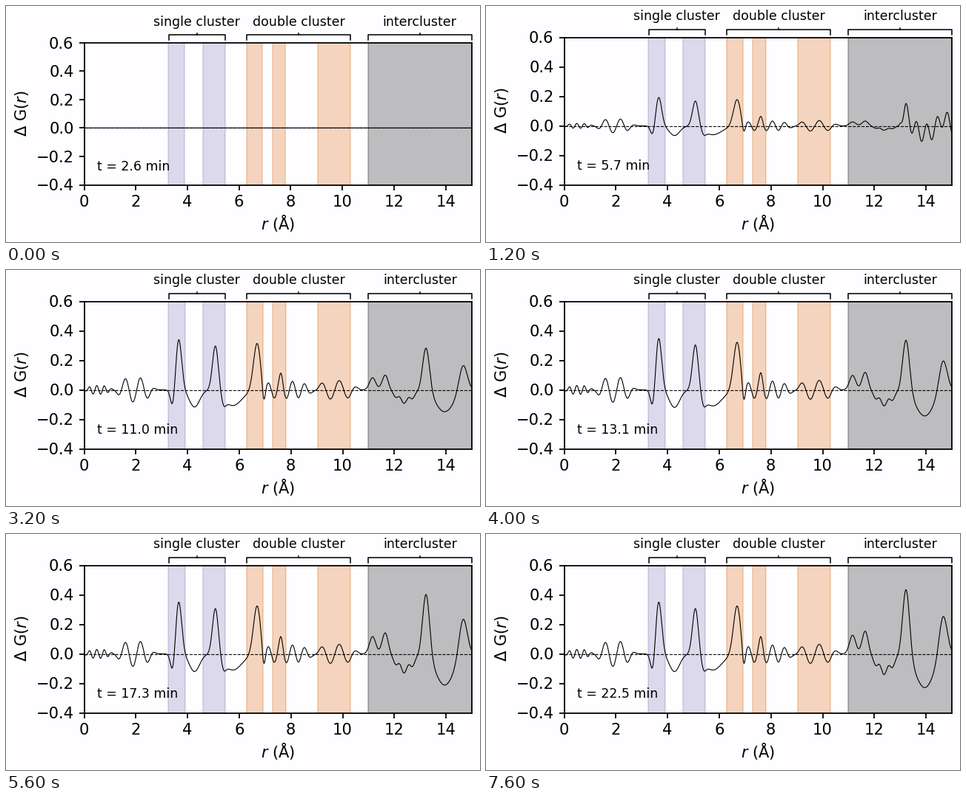
A matplotlib script for the animation above (8000 ms loop, 640 by 320 pixels).

```python
import numpy as np
import matplotlib.pyplot as plt
from matplotlib.animation import FuncAnimation
from matplotlib.transforms import Affine2D

W, H, DPI = 640, 320, 160
FRAMES, INTERVAL = 20, 400
BIG, SMALL = 9.45, 7.85
PAPER = "#fefdff"
PURPLE, ORANGE, BLACK = "#7570b3", "#d95f02", "black"

# Atom-pair peaks and the dips around them: r, width, final height
BUMPS = [
    (3.43, .12, -.13), (3.66, .16, .355), (4.27, .28, -.12), (5.08, .16, .325),
    (5.40, .12, -.05), (5.75, .50, -.11), (6.69, .20, .32), (6.95, .08, -.10),
    (7.62, .09, .06), (11.16, .17, .13), (11.65, .17, .165), (12.40, .45, -.12),
    (13.23, .19, .48), (13.95, .50, -.235), (14.66, .22, .29),
]
# Wave packets: first crest, period, amplitude, centre, half width
RIPPLES = [
    (.20, .29, .03, .55, .45), (1.59, .59, .085, 1.95, .65), (7.12, .47, .06, 7.8, .95),
    (9.18, .69, .065, 9.75, .75), (12.20, .35, .025, 12.4, .45),
]

r = np.linspace(0, 15, 1800)


def bump(centre, width, power=2):
    return np.exp(-np.abs((r - centre) / width) ** power)


def wave(crest, period):
    return np.cos(2 * np.pi * (r - crest) / period)


def growth(centre, k):
    """Order inside the clusters forms faster than order between them."""
    pace = 3.5 if centre < 11 else 8
    return 1 - np.exp(-(k / pace) ** 1.5)


def delta_g(k):
    g = sum(height * growth(c, k) * bump(c, width) for c, width, height in BUMPS)
    g += sum(amp * growth(c, k) * wave(crest, period) * bump(c, half, 4)
             for crest, period, amp, c, half in RIPPLES)
    passing = k / 3 * np.exp(1 - (k / 3) ** 2)
    return g + .06 * passing * wave(13.23, .4) * np.clip((r - 13) / .2, 0, 1)


fig = plt.figure(figsize=(W / DPI, H / DPI), dpi=DPI, facecolor=PAPER)
ax = fig.add_axes([0, 0, 1, 1], facecolor=PAPER)
ax.set(xlim=(0, 15), ylim=(-.4, .6), xticks=range(0, 15, 2))
ax.set_yticks(np.arange(-2, 4) / 5)
ax.tick_params(labelsize=BIG, length=3.3, pad=3)

for lo, hi, color in [(3.26, 3.9, PURPLE), (4.59, 5.45, PURPLE), (6.29, 6.91, ORANGE),
                      (7.29, 7.8, ORANGE), (9.04, 10.3, ORANGE), (10.99, 15, BLACK)]:
    ax.axvspan(lo, hi, color=color, alpha=.255, lw=.8)

# x in data units, y in pixels above the top of the axes
above_axes = ax.get_xaxis_transform() + Affine2D().translate(0, 0)


def draw_above(xs, rises):
    for_pixels = [1 + rise / 200 for rise in rises]
    ax.plot(xs, for_pixels, color="black", lw=.7, clip_on=False, transform=above_axes)


for name, lo, hi in [("single cluster", 3.27, 5.45), ("double cluster", 6.3, 10.3),
                     ("intercluster", 11, 15)]:
    mid = (lo + hi) / 2
    draw_above((lo, lo, hi, hi), (3.5, 10.5, 10.5, 3.5))
    draw_above((mid, mid), (10.5, 13))
    ax.text(mid, 1 + 23.5 / 200, name, fontsize=SMALL, ha="center", va="baseline",
            transform=above_axes)

ax.axhline(0, color="black", ls="--", lw=.5)
curve, = ax.plot([], [], color="black", lw=.5)
clock = ax.text(.5, -.3, "", fontsize=SMALL)
fig.text(367 / W, 1 - 294.5 / H, "$r$ (Å)", fontsize=BIG, ha="center", va="center")
y_label = fig.text(21.5 / W, .5, "Δ G($r$)", fontsize=BIG, rotation=90,
                   ha="center", va="center")


def update(k):
    # The plot grows slightly after its opening frame
    top, right = (49.5, 628.5) if k == 0 else (42.5, 629)
    left, bottom = 105.5, 242.5
    ax.set_position([left / W, 1 - bottom / H, (right - left) / W, (bottom - top) / H])
    y_label.set_y(1 - ((top + bottom) / 2 - .5) / H)
    curve.set_data(r, delta_g(k))
    clock.set_text(f"t = {2.58 + 1.05 * k:.1f} min")
    return curve, clock, y_label


anim = FuncAnimation(fig, update, frames=FRAMES, interval=INTERVAL, repeat=True,
                     repeat_delay=0, blit=False)
plt.show()
```
